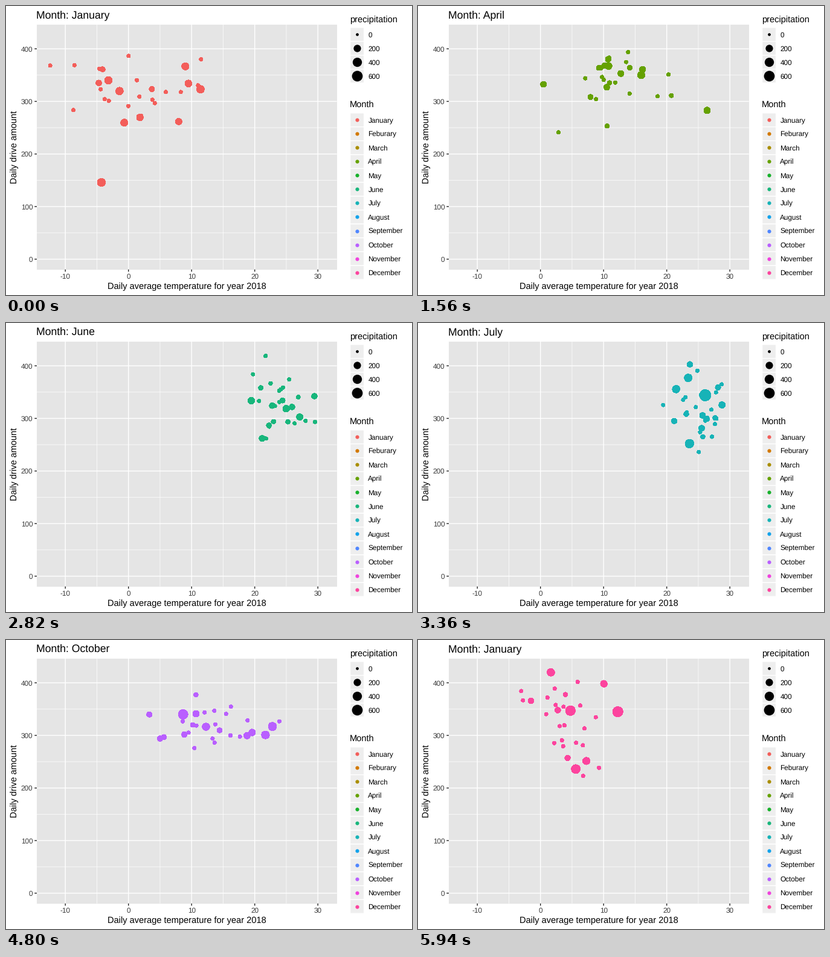
A matplotlib script that plays this animation: 672x480 px, repeating every 6000 ms.

```python
import matplotlib.pyplot as plt
import numpy as np
from matplotlib.animation import FuncAnimation
from matplotlib.patches import Rectangle

W, H, DPI = 672, 480, 96
PX = 72 / DPI
FRAMES, INTERVAL = 100, 60
LEFT, RIGHT, TOP, BOTTOM = 51, 547.7, 31, 437.6
THICK, THIN = 1.42, .71

plt.rcParams.update({"font.family": "Liberation Sans", "text.hinting": "none",
                     "text.hinting_factor": 8})

# Name, colour, temperature (mean, spread), drive amount (mean, spread)
# and the wettest days (temperature, drive amount, precipitation).
MONTHS = [
    ("January", "#F35E5A", (.3, 6.4), (322, 36),
     [(-4.3, 146, 220), (11.4, 323, 190), (9.5, 334, 130)]),
    ("Feburary", "#D37900", (5.2, 5.3), (360, 40),
     [(12, 293, 330), (3.4, 305, 250), (3.1, 370, 225)]),
    ("March", "#A98E00", (6, 3.5), (345, 36), []),
    ("April", "#65A100", (12, 5), (340, 36), []),
    ("May", "#17B12B", (19.8, 3.8), (329, 37),
     [(11.35, 367, 200), (23.6, 326, 180), (20, 250, 140)]),
    ("June", "#18B67C", (24, 2.6), (325, 36), []),
    ("July", "#17B3B7", (25.3, 2.4), (317, 38),
     [(26.1, 344, 640), (23.6, 252, 290), (23.4, 377, 200)]),
    ("August", "#14A3EB", (25.6, 2.7), (314, 32),
     [(23.95, 286, 620), (26.4, 342, 290), (25.6, 290, 180)]),
    ("September", "#5086FF", (22, 3.8), (315, 36), []),
    ("October", "#B95FFF", (13.2, 5), (318, 23),
     [(8.65, 340, 390), (22.8, 317, 250), (21.7, 301, 210)]),
    ("November", "#F043DE", (7, 4), (325, 36), []),
    ("December", "#FC449E", (3.9, 3.3), (330, 53),
     [(12.25, 345, 470), (4.75, 347, 400), (5.6, 236, 310)]),
]


def px(temp):
    return 202.7 + 10.45 * temp


def py(drive):
    return 420.5 - .8735 * drive


def radius(rain):
    return 2.37 + 7.11 * np.sqrt(rain / 726)


def area(r):
    return (2 * r * PX) ** 2


def sample(rng, mean, spread, n):
    x = rng.normal(size=n)
    return mean + spread * (x - x.mean()) / x.std()


def make_days(seed, temp, drive, wet):
    """Centres and marker areas: the wettest days plus random ones."""
    rng = np.random.default_rng(seed)
    n = 30 - len(wet)
    t = np.clip(sample(rng, *temp, n), -12.4, 31)
    d = np.clip(sample(rng, *drive, n), 155, 420)
    rain = np.where(rng.random(n) < .6, 1, rng.exponential(70, n))
    days = np.column_stack([t, d, np.minimum(rain, 180)])
    if wet:
        days = np.vstack([days, wet])
    t, d, rain = days.T
    # Hard-edged dots cover their whole rim.
    return np.column_stack([px(t), py(d)]), area(radius(rain) + .4)


points = [make_days(i, *month[2:]) for i, month in enumerate(MONTHS)]

fig = plt.figure(figsize=(W / DPI, H / DPI), dpi=DPI, facecolor="white")
ax = fig.add_axes([0, 0, 1, 1])
ax.set(xlim=(0, W), ylim=(H, 0))
ax.axis("off")


def line(x0, y0, x1, y1, color="white", width=THICK):
    ax.plot([x0, x1], [y0, y1], color=color, lw=width * PX, zorder=1,
            solid_capstyle="butt", snap=False)


def text(x, y, s, size, color="black", **kw):
    return ax.text(x, y, s, fontsize=size, color=color, va="baseline", **kw)


def box(x, y, w, h, color, **kw):
    ax.add_patch(Rectangle((x, y), w, h, fc=color, **kw))


def legend(y, heading, keys):
    text(569.2, y, heading, 11)
    for i, (label, color, r) in enumerate(keys):
        cy = y + 20.2 + 23.04 * i
        box(569.6, cy - 11.5, 23, 23, "#EEEEEE", ec="white", lw=THICK * PX,
            snap=False)
        ax.scatter([581.1], [cy], s=area(r), c=color, lw=0, zorder=3)
        text(599.4, cy + 4.3, label, 8.8)


# Panel, grid and axes
box(LEFT, TOP, RIGHT - LEFT, BOTTOM - TOP, "#E5E5E5", lw=0, zorder=0)
for t in range(-10, 31, 5):
    line(px(t), TOP, px(t), BOTTOM, width=THIN if t % 10 else THICK)
for d in range(0, 401, 50):
    line(LEFT, py(d), RIGHT, py(d), width=THIN if d % 100 else THICK)
for t in range(-10, 31, 10):
    line(px(t), BOTTOM, px(t), BOTTOM + 3.7, "#262626")
    text(px(t), 453, str(t), 8.8, "#3C3C3C", ha="center")
for d in range(0, 401, 100):
    line(LEFT - 3.7, py(d), LEFT, py(d), "#262626")
    text(44.4, py(d) + 4.3, str(d), 8.8, "#3C3C3C", ha="right")
text(299.3, 470, "Daily average temperature for year 2018", 11, ha="center")
text(18, 234.3, "Daily drive amount", 11, ha="center", rotation=90,
     rotation_mode="anchor")

legend(27, "precipitation",
       [(str(p), "black", radius(p)) for p in range(0, 601, 200)])
legend(169, "Month", [(name, color, 3.08) for name, color, *_ in MONTHS])

title = text(50.5, 20, "", 13.2)
dots = ax.scatter([], [], lw=0, zorder=2, antialiased=False)

# The first five months hold one step longer than the others.
starts = [8 * m + min(m, 5) - 1 for m in range(1, 13)]


def month_at(step):
    return sum(s <= step for s in starts) % 12


def update(i):
    m = month_at(i)
    xy, sizes = points[m]
    dots.set_offsets(xy)
    dots.set_sizes(sizes)
    dots.set_facecolor(MONTHS[m][1])
    # The title runs one step ahead of the dots.
    title.set_text("Month: " + MONTHS[month_at(i + 1)][0])
    return dots, title


anim = FuncAnimation(fig, update, frames=FRAMES, interval=INTERVAL,
                     repeat=True, repeat_delay=0)
plt.show()
```
